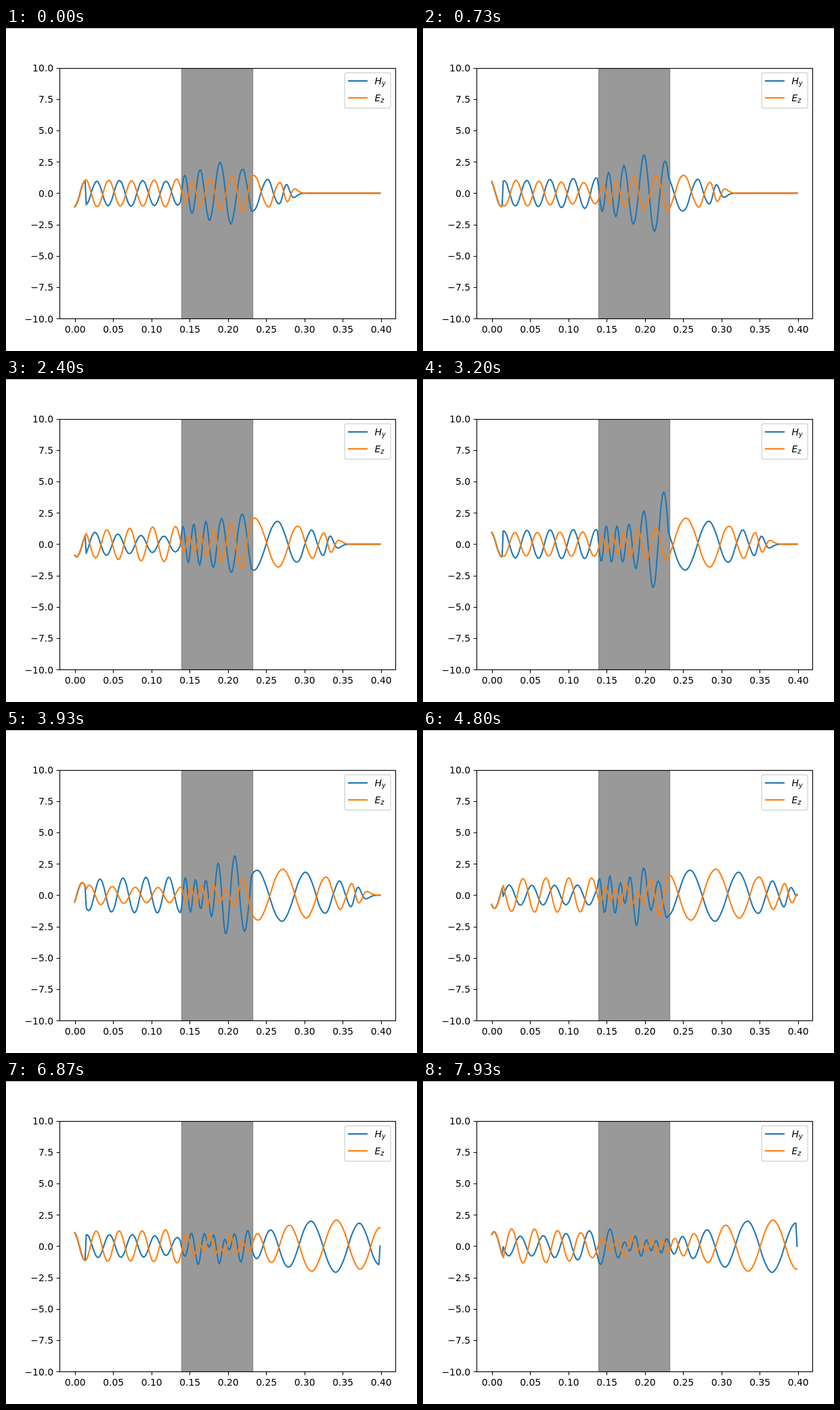
Write an HTML page that moves like this. It is 607 by 476 pixels and loops after 8 s.

```html
<!DOCTYPE html>
<html lang="en">
<head>
<meta charset="utf-8">
<title>Wave through a modulated slab</title>
<style>
  html, body { margin: 0; width: 100%; height: 100%; overflow: hidden; background: #fff; }
  svg { display: block; }
  text { font: 13.89px "DejaVu Sans", sans-serif; fill: #000; }
  .math { font-style: italic; }
  .sub { font-size: 9.72px; }
  .axis { fill: none; stroke: #000; stroke-width: 1.11; }
  .wave { fill: none; stroke-width: 2.08; stroke-linejoin: round; stroke-linecap: square; }
  .h { stroke: #1f77b4; }
  .e { stroke: #ff7f0e; }
</style>
</head>
<body>
<svg width="607" height="476" viewBox="0 0 607 476">
  <rect width="607" height="476" fill="#fff"/>
  <rect width="607" height="1" fill="#b0b0b0"/>
  <clipPath id="area"><rect x="79" y="59" width="496" height="369.2"/></clipPath>
  <g clip-path="url(#area)">
    <rect x="259.5" y="59.5" width="105" height="369" fill="#808080" fill-opacity=".8"
          stroke="#808080" stroke-opacity=".8" stroke-width="1.39"/>
    <path id="hLine" class="wave h"/>
    <path id="eLine" class="wave e"/>
  </g>
  <rect class="axis" x="79.5" y="59.5" width="496" height="369"/>
  <g id="ticks"></g>
  <rect x="500.3" y="66" width="67.8" height="52.3" rx="2.8" fill="#fff" fill-opacity=".8"
        stroke="#ccc" stroke-opacity=".8" stroke-width="1.39"/>
  <path class="wave h" d="M506 78H533"/>
  <path class="wave e" d="M506 103H533"/>
  <text class="math" x="544.4" y="83">H</text>
  <text class="math sub" x="554.9" y="85.3">y</text>
  <text class="math" x="544.4" y="108">E</text>
  <text class="math sub" x="553.2" y="110.3">z</text>
</svg>
<script>
const LOOP = 8000, FRAMES = 120;

// Grid: 20 cells per wavelength, Courant number 0.5
const CELLS = 267, DX = 0.0015, S = 0.5;
const SOURCE = 10, SLAB_START = 93, SLAB_END = 155;
const PERIOD = 40, MOD_PERIOD = 400;   // in steps
const WARM_UP = 410, STEPS_PER_FRAME = 32 / 15;

// Plot coordinates
const X0 = 101.55, PX_X = 450.9 / ((CELLS - 1) * DX);
const Y0 = 243.4, PX_Y = 18.48;
const px = x => X0 + x * PX_X;
const py = y => Y0 - y * PX_Y;
const snap = v => Math.round(v) + 0.5;

function drawTicks() {
  let out = '';
  for (let i = 0; i <= 8; i++) {
    const x = i * 0.05, y = 10 - i * 2.5;
    const tx = snap(px(x)), ty = snap(py(y));
    const label = y.toFixed(1).replace('-', '\u2212');
    out += `<path class="axis" d="M${tx} 428.5v4.9M79.5 ${ty}h-4.9"/>`
      + `<text x="${px(x) + 0.6}" y="449" text-anchor="middle">${x.toFixed(2)}</text>`
      + `<text x="70" y="${Math.round(py(y) + 5.3)}" text-anchor="end">${label}</text>`;
  }
  document.getElementById('ticks').innerHTML = out;
}

const permittivity = n => 3 + 2 * Math.sin(2 * Math.PI * n / MOD_PERIOD);

function toPath(field) {
  return 'M' + Array.from(field, (v, i) =>
    px(i * DX).toFixed(2) + ' ' + py(v).toFixed(2)).join('L');
}

function simulate() {
  const E = new Float64Array(CELLS), H = new Float64Array(CELLS);
  const last = CELLS - 1, mur = (S - 1) / (S + 1);

  function step(n) {
    for (let i = 0; i < last; i++) H[i] += S * (E[i + 1] - E[i]);
    const left = E[1], right = E[last - 1];
    const eps = permittivity(n), gain = eps / permittivity(n - 1);
    for (let i = 1; i < last; i++) {
      const curl = S * (H[i] - H[i - 1]);
      const inSlab = i >= SLAB_START && i < SLAB_END;
      E[i] = inSlab ? E[i] * gain + curl / eps : E[i] + curl;
    }
    E[SOURCE] += Math.sin(2 * Math.PI * n / PERIOD);
    // Absorbing ends
    E[0] = left + mur * (E[1] - E[0]);
    E[last] = right + mur * (E[last - 1] - E[last]);
  }

  const frames = [];
  let n = 0;
  for (let f = 0; f < FRAMES; f++) {
    const until = WARM_UP + Math.round(f * STEPS_PER_FRAME);
    while (n < until) step(n++);
    frames.push({ h: toPath(H), e: toPath(E) });
  }
  return frames;
}

drawTicks();
const frames = simulate();
const hLine = document.getElementById('hLine');
const eLine = document.getElementById('eLine');
let shown = -1;

function render(ms) {
  // Frame changes fall on multiples of 10 ms
  const t = Math.floor((ms % LOOP) / 10) * 10;
  const index = Math.floor((t + 5) * FRAMES / LOOP) % FRAMES;
  if (index === shown) return;
  shown = index;
  hLine.setAttribute('d', frames[index].h);
  eLine.setAttribute('d', frames[index].e);
}

const start = performance.now();
function tick() {
  render(performance.now() - start);
  requestAnimationFrame(tick);
}
tick();
</script>
</body>
</html>
```
